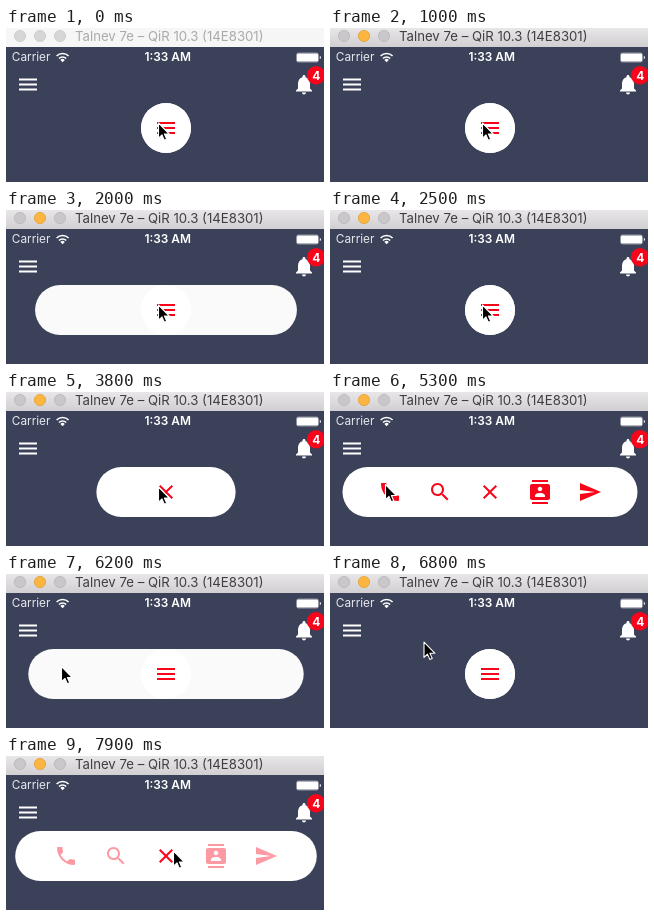
Write an HTML page that moves like this. It is 318 px wide and 154 px high and loops after 8 s.

```html
<!DOCTYPE html>
<html lang="en">
<head>
<meta charset="utf-8">
<title>Expanding menu</title>
<style>
  html, body { margin: 0; width: 100%; height: 100%; overflow: hidden; background: #3a4158; }
  svg { display: block; width: 318px; height: 154px; font-family: Inter, Roboto, sans-serif; }
</style>
</head>
<body>
<svg viewBox="0 0 318 154">
  <defs>
    <linearGradient id="chrome" x2="0" y2="1">
      <stop stop-color="#e8e6e8"/><stop offset="1" stop-color="#d1cfd1"/>
    </linearGradient>
    <path id="burger" d="M3 18h18v-2H3zM3 13h18v-2H3zM3 6v2h18V6z"/>
  </defs>

  <rect width="318" height="154" fill="#3a4158"/>
  <rect id="bar" width="318" height="19"/>
  <g id="lights" stroke-width=".8">
    <circle cx="14" cy="8" r="5.6"/>
    <circle cx="34" cy="8" r="5.6"/>
    <circle cx="54" cy="8" r="5.6"/>
  </g>
  <text id="title" x="69" y="13" font-size="13.2">Talnev 7e – QiR 10.3 (14E8301)</text>

  <g fill="#fff">
    <text x="5.8" y="33.3" font-size="11.8" fill="#e8e9ed">Carrier</text>
    <text x="161.7" y="33.3" font-size="11.9" font-weight="600" text-anchor="middle">1:33 AM</text>
    <path d="M50.6 28a8.4 8.4 0 0 1 12 0M53 30.5a5 5 0 0 1 7.2 0" fill="none" stroke="#fff" stroke-width="1.6"/>
    <path d="M56.6 34.2l-2.2-2.3a3.1 3.1 0 0 1 4.4 0z"/>
    <rect x="290.5" y="25" width="22" height="9" rx="2" fill="none" stroke="#fff" stroke-opacity=".45"/>
    <rect x="291" y="25.5" width="21" height="8" rx="1.2"/>
    <path d="M313.8 27.7a2 2 0 0 1 0 3.6z"/>
    <use href="#burger" x="10" y="44.5"/>
    <path transform="translate(286 44.5)" d="M12 22c1.1 0 2-.9 2-2h-4c0 1.1.89 2 2 2zm6-6v-5c0-3.07-1.64-5.64-4.5-6.32V4c0-.83-.67-1.5-1.5-1.5s-1.5.67-1.5 1.5v.68C7.63 5.36 6 7.92 6 11v5l-2 2v1h16v-1l-2-2z"/>
    <circle cx="310" cy="47.2" r="9.2" fill="#f7061b"/>
    <text x="310.2" y="51.7" font-size="12" font-weight="700" text-anchor="middle">4</text>
  </g>

  <rect id="pill" y="75" height="50" rx="25"/>
  <circle cx="160" cy="100" r="25" fill="#fff"/>
  <g fill="#f7061b">
    <g id="icons">
      <path transform="translate(48 88)" d="M6.62 10.79c1.44 2.83 3.76 5.14 6.59 6.59l2.2-2.2c.27-.27.67-.36 1.02-.24 1.12.37 2.33.57 3.57.57.55 0 1 .45 1 1V20c0 .55-.45 1-1 1-9.39 0-17-7.61-17-17 0-.55.45-1 1-1h3.5c.55 0 1 .45 1 1 0 1.25.2 2.45.57 3.57.11.35.03.74-.25 1.02l-2.2 2.2z"/>
      <path transform="translate(98 88)" d="M15.5 14h-.79l-.28-.27C15.41 12.59 16 11.11 16 9.5 16 5.91 13.09 3 9.5 3S3 5.91 3 9.5 5.91 16 9.5 16c1.61 0 3.09-.59 4.23-1.57l.27.28v.79l5 4.99L20.49 19l-4.99-5zm-6 0C7.01 14 5 11.99 5 9.5S7.01 5 9.5 5 14 7.01 14 9.5 11.99 14 9.5 14z"/>
      <path transform="translate(198 88)" d="M20 0H4v2h16V0zM4 24h16v-2H4v2zM20 4H4c-1.1 0-2 .9-2 2v12c0 1.1.9 2 2 2h16c1.1 0 2-.9 2-2V6c0-1.1-.9-2-2-2zm-8 2.75c1.24 0 2.25 1.01 2.25 2.25s-1.01 2.25-2.25 2.25S9.75 10.24 9.75 9 10.76 6.75 12 6.75zM17 17H7v-1.5c0-1.67 3.33-2.5 5-2.5s5 .83 5 2.5V17z"/>
      <path transform="translate(248 88)" d="M2.01 21L23 12 2.01 3 2 10l15 2-15 2z"/>
    </g>
    <use id="menu" href="#burger" x="148" y="88"/>
    <path id="close" transform="translate(148 88)" d="M19 6.41L17.59 5 12 10.59 6.41 5 5 6.41 10.59 12 5 17.59 6.41 19 12 13.41 17.59 19 19 17.59 13.41 12z"/>
  </g>
  <path id="cursor" d="M0 0v15.2l3.5-3.3 2.3 5.3 2.4-1-2.3-5.2h4.9z" fill="#000" stroke="#fff" stroke-width="1.1" stroke-linejoin="round"/>
</svg>
<script>
const LOOP = 8000, STEP = 100, CLOSED = 50, WIDE = 295;
const $ = id => document.getElementById(id);
const clamp = v => Math.min(1, Math.max(0, v));
const smooth = p => p * p * (3 - 2 * p);

// Menu taps as [time, opens]
const TAPS = [[0, false], [1600, true], [1870, false], [3800, true], [6100, false], [7500, true]];

// Pointer moves as [start, end, x, y]
const MOVES = [
  [4000, 4600, 161, 62.5], [4600, 5300, 55.5, 92.5],
  [6200, 6800, 94, 68.2], [6800, 7200, 167.5, 95]
];

// Damped spring from 0 to 1; s in seconds
function spring(s) {
  const damp = .755, speed = 9, wave = speed * Math.sqrt(1 - damp * damp);
  const decay = damp * speed;
  return 1 - Math.exp(-decay * s) * (Math.cos(wave * s) + decay / wave * Math.sin(wave * s));
}

function easeInOut(p) {
  return p < .5 ? 2 * p * p : 1 - 2 * (1 - p) ** 2;
}

function pointerAt(t) {
  let x = 152.5, y = 95;
  for (const [from, to, toX, toY] of MOVES) {
    const p = smooth(clamp((t - from) / (to - from)));
    x += (toX - x) * p;
    y += (toY - y) * p;
  }
  return [x, y];
}

function paintChrome(active) {
  $('bar').setAttribute('fill', active ? 'url(#chrome)' : '#f6f6f6');
  $('title').setAttribute('fill', active ? '#3f3e40' : '#aaa');
  [...$('lights').children].forEach((light, i) => {
    const amber = active && i === 1;
    light.setAttribute('fill', amber ? '#fdb541' : active ? '#c9c7ca' : '#d6d6d6');
    light.setAttribute('stroke', amber ? '#e2a032' : active ? '#b7b5b8' : '#c9c9c9');
  });
}

function draw(now) {
  const t = Math.floor(now % LOOP / STEP) * STEP;
  const [start, open] = TAPS.filter(tap => tap[0] <= t).pop();
  const s = (t - start) / 1000;
  const spread = open ? spring(s + .128) : start ? 1 - easeInOut(clamp(s / .5)) : 0;
  const w = CLOSED + (WIDE - CLOSED) * spread;

  paintChrome(t >= 700);
  $('pill').setAttribute('x', 160 - w / 2);
  $('pill').setAttribute('width', w);
  $('pill').setAttribute('fill', open ? '#fff' : '#fafafa');
  $('icons').setAttribute('opacity', open ? clamp((s - .3) * 4) : 0);
  $('menu').style.display = open ? 'none' : '';
  $('close').style.display = open ? '' : 'none';
  $('cursor').setAttribute('transform', `translate(${pointerAt(t)})`);
}

const began = performance.now();
function tick() {
  draw(performance.now() - began);
  requestAnimationFrame(tick);
}
tick();
</script>
</body>
</html>
```
